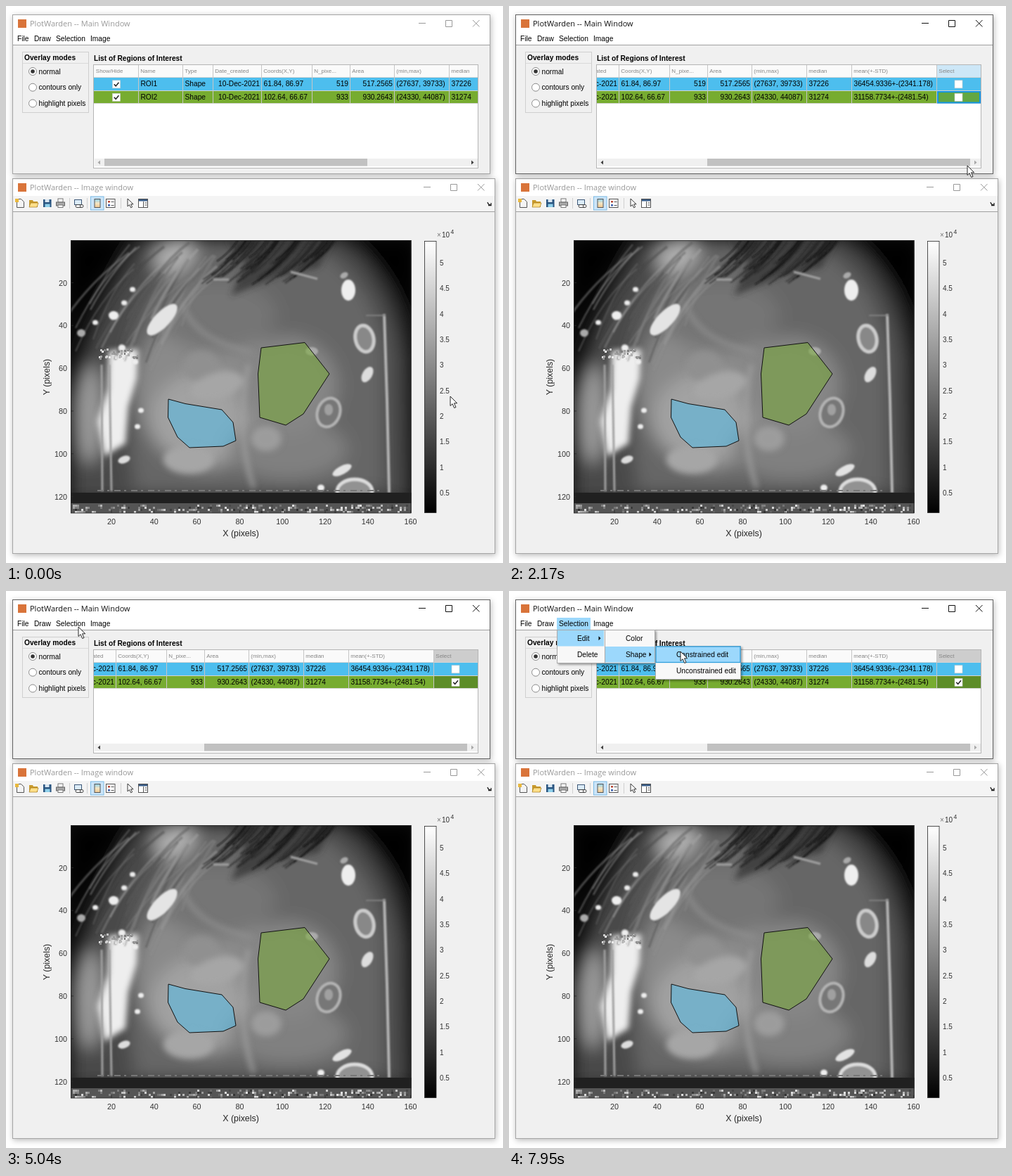
Animation, 707 px wide and 792 px high, one loop 8000 ms. Source, as an HTML page:

```html
<!DOCTYPE html>
<html lang="en">
<head>
<meta charset="utf-8">
<title>Region editor</title>
<style>
html, body { margin: 0; width: 100%; height: 100%; overflow: hidden; background: #fff; }
svg { display: block; font: 10.2px "Liberation Sans", Arial, sans-serif; }
text { white-space: pre; }
.title { font: 11px "Open Sans", sans-serif; }
.head { font-size: 8px; fill: #858585; }
.bold { font-weight: bold; }
.tick { font-size: 10.8px; fill: #333; }
.small { font-size: 10px; fill: #333; }
.axis { font-size: 12.4px; fill: #262626; }
.win { filter: drop-shadow(1px 2px 4px rgba(0,0,0,.28)); }
.menu { filter: drop-shadow(2px 2px 1.5px rgba(0,0,0,.35)); }
</style>
</head>
<body>
<script>
const LOOP = 8000;
const HOT = '#9cd8fc', EDGE = '#2f9fdc';
const BLUE = '#4dbeee', GREEN = '#77ac30';

const text = (x, y, s, attrs = '') => `<text x="${x}" y="${y}" ${attrs}>${s}</text>`;
const rect = (x, y, w, h, fill, attrs = '') =>
  `<rect x="${x}" y="${y}" width="${w}" height="${h}" fill="${fill}" ${attrs}/>`;
const path = (d, attrs = '') => `<path d="${d}" ${attrs}/>`;
const line = (d, color, width = 1, attrs = '') =>
  path(d, `fill="none" stroke="${color}" stroke-width="${width}" ${attrs}`);
const oval = (x, y, rx, ry, fill, turn = 0, attrs = '') =>
  `<ellipse cx="${x}" cy="${y}" rx="${rx}" ry="${ry}" fill="${fill}" transform="rotate(${turn} ${x} ${y})" ${attrs}/>`;
const group = (attrs, ...parts) => `<g ${attrs}>${parts.join('')}</g>`;
const range = (n, fn) => Array.from({ length: n }, (_, i) => fn(i)).join('');
const gray = v => `rgb(${v},${v},${v})`;

let seed = 7;
const rnd = (lo, hi) => {
  seed = seed * 16807 % 2147483647;
  return Math.round(lo + (hi - lo) * seed / 2147483647);
};

// ---- window chrome ----
const frame = (id, x, y, w, h, title) => {
  const cx = x + w, cy = y + 12.5;
  return rect(x + .5, y + .5, w - 1, h - 1, '#f0f0f0', `id="${id}Edge" class="win" stroke="#a5a5a5"`) +
    rect(x + 1, y + 1, w - 2, 25, '#fff') +
    rect(x + 8, y + 7, 12, 12, '#d9743a') +
    text(x + 25, y + 16.5, title, `id="${id}Title" class="title" fill="#999"`) +
    line(`M${cx - 102} ${cy}h10M${cx - 63.5} ${cy - 4}h9v9h-9zM${cx - 25} ${cy - 4.5}l9.5 9.5m0-9.5l-9.5 9.5`,
      '#999', 1, `id="${id}Btns"`);
};

// ---- region table ----
const cols = [125, 188.5, 251.5, 294.5, 363.5, 435.5, 489.5, 552.5, 630.5, 694.5, 815.5, 878.5];
const heads = ['Show/Hide', 'Name', 'Type', 'Date_created', 'Coords(X,Y)', 'N_pixe...', 'Area',
  '(min,max)', 'median', 'mean(+-STD)', 'Select'];
const rightAligned = [3, 5, 6];
const rows = [
  ['ROI1', 'Shape', '10-Dec-2021', '61.84, 86.97', '519', '517.2565', '(27637, 39733)', '37226', '36454.9336+-(2341.178)'],
  ['ROI2', 'Shape', '10-Dec-2021', '102.64, 66.67', '933', '930.2643', '(24330, 44087)', '31274', '31158.7734+-(2481.54)']
];
const tick = (x, y) => line(`M${x - 3.2} ${y}l2.4 2.6l4.2-5.2`, '#222', 1.6);
const box = (x, y) => rect(x - 5.5, y - 5.5, 11, 11, '#fff', 'stroke="#ccc" stroke-width=".6"');

const row = (cells, i) => {
  const y = 102 + i * 18.5;
  return rect(125, y, 753, 18, i ? GREEN : BLUE) +
    box(157, y + 9.3) + tick(157, y + 9.3) +
    (i ? rect(815.5, y, 62.5, 18, '#62a743', 'id="cell"') : '') +
    box(846.5, y + 9.3) +
    cells.map((s, k) => rightAligned.includes(k + 1)
      ? text(cols[k + 2] - 2.5, y + 12, s, 'text-anchor="end"')
      : text(cols[k + 1] + 3, y + 12, s)).join('');
};

const table =
  rect(124.5, 83.5, 547, 147, '#fff', 'stroke="#b5b5b5"') +
  group('clip-path="url(#view)"', group('id="grid"',
    rect(125, 84, 753, 17.5, '#fafafa'),
    rect(815.5, 84, 62.5, 17.5, '#cde7f7', 'id="selHead"'),
    heads.map((s, i) => text(cols[i] + 2.8, 94.5, s, 'class="head"')).join(''),
    rows.map(row).join(''),
    line('M125 101.5h753M125 120.5h753M125 138.5h753', '#d4d4d4'),
    line(cols.slice(1).map(x => `M${x} 84v54`).join(''), '#c6c6c6'),
    rect(817, 122, 60, 15.5, 'none', 'id="focus" stroke="#1296e6" stroke-width="2"'),
    group('id="checked"', tick(846.5, 129.8)))) +
  rect(126, 217, 545, 11, '#f0f0f0') +
  rect(140, 217, 374, 10.5, '#c1c1c1', 'id="thumb"') +
  path('M134 219.5v6l-3.5-3z', 'id="goLeft"') + path('M662 219.5v6l3.5-3z', 'id="goRight"');

const radio = (y, label, on) =>
  `<circle cx="38" cy="${y}" r="5.5" fill="#fff" stroke="#8c8c8c"/>` +
  (on ? `<circle cx="38" cy="${y}" r="2.8" fill="#333"/>` : '') + text(46.5, y + 3.5, label);

const mainWindow = frame('main', 9, 12, 680, 227, 'PlotWarden -- Main Window') +
  rect(10, 38, 678, 17.5, '#fff') + line('M10 55.5h678', '#a0a0a0') +
  rect(68, 38, 48, 17, HOT, 'id="barHot"') +
  text(16, 50, 'File') + text(40, 50, 'Draw') + text(71, 50, 'Selection') + text(120, 50, 'Image') +
  rect(23.5, 65.5, 94, 86, 'none', 'stroke="#cfcfcf"') + line('M24 81.5h93', '#dadada') +
  text(26, 77, 'Overlay modes', 'class="bold"') +
  radio(93, 'normal', true) + radio(115.7, 'contours only') + radio(138.5, 'highlight pixels') +
  text(125, 77.5, 'List of Regions of Interest', 'class="bold"') + table;

// ---- toolbar ----
const tools =
  line('M15.5 274.5h6l4 4v8h-10z', '#555') + path('M13 274h5v5h-5z', 'fill="#e9b83c"') +
  path('M33 276h5l1 2h6v8h-12z', 'fill="#c89a2c"') + path('M35 280h11l-2 6h-11z', 'fill="#ffe08a" stroke="#a47a1c" stroke-width=".7"') +
  rect(53, 275, 11.5, 11, '#2a5580') + rect(55.5, 275, 6, 4, '#d8e6f2') + rect(55.5, 281.5, 7, 4.5, '#8fd0ea') +
  rect(74, 274, 7, 5, '#fff', 'stroke="#777"') + rect(71.5, 279, 12, 5, '#aaa', 'stroke="#666"') + rect(74, 283, 7, 3.5, '#fff', 'stroke="#777"') +
  rect(97.5, 275.5, 10, 7, '#dcecf8', 'stroke="#3d5878"') + line('M101 286.5h3a2 2 0 0 0 0-4h-3a2 2 0 0 0 0 4m4 0h3a2 2 0 0 0 0-4h-3', '#444') +
  rect(120.5, 271, 18.5, 19, '#cce5f8', 'stroke="#7cbce8"') +
  rect(126, 274.5, 8, 12, 'url(#scale)', 'stroke="#555"') +
  rect(142.5, 274.5, 12.5, 12, '#fff', 'stroke="#555"') + rect(145, 277, 3, 2.5, '#bb4a38') + rect(145, 282, 3, 2.5, '#3c62b0') +
  line('M149.5 278.5h4m-4 5h4', '#555') +
  path('M173 274v11l2.6-2.4 2 4.2 2-1-2-4h3.5z', 'fill="#fff" stroke="#222" stroke-width=".9"') +
  rect(188.5, 274.5, 13, 12, '#fff', 'stroke="#555"') + rect(189, 275, 12, 2.5, '#365a86') + line('M195.5 278v8m2-6h3m-3 3h3', '#555') +
  line('M90.5 273v15M115.5 273v15M163.5 273v15', '#d0d0d0') +
  line('M685 279q1 4 5 4m0-3v3.5h-4', '#222', 1.3);

// ---- photograph as soft tonal shapes ----
const spot = (x, y, r, c = '#eee') => oval(x, y, r, r * .9, c);
const fibre = () => {
  const x = rnd(175, 310), dx = rnd(45, 95), y = rnd(335, 390);
  return line(`M${x} ${y}q${-dx * .6} 40 ${-dx} ${rnd(85, 130)}`, gray(rnd(70, 165)), rnd(2, 4), 'opacity=".5"');
};
const hair = () => {
  const x = rnd(325, 470), h = rnd(25, 65);
  return line(`M${x} 333q${-h * .4} ${h * .6} ${-h} ${h}`, gray(rnd(12, 50)), 2, 'opacity=".75"');
};
const speck = (x, y, lo, hi) => rect(x, y, 3, 3, gray(rnd(lo, hi)));

const photo = group('clip-path="url(#plot)"',
  rect(92, 333, 485, 389, '#0c0c0c'),
  group('filter="url(#b12)"',
    path('M92 705V560Q120 440 190 330L480 330Q560 395 572 500L575 705z', 'fill="#484848"'),
    path('M180 690L172 500Q190 410 250 335L450 350Q530 400 538 500L538 690z', 'fill="#666"'),
    oval(285, 545, 100, 115, '#8a8a8a'), oval(285, 585, 78, 65, '#a2a2a2'),
    oval(400, 630, 85, 42, '#808080'), oval(400, 540, 72, 70, '#868686'),
    oval(300, 440, 85, 50, '#747474'), oval(240, 355, 32, 24, '#b0b0b0', -35),
    oval(118, 580, 20, 70, '#9a9a9a'), oval(150, 670, 35, 20, '#4a4a4a'),
    path('M92 470Q110 400 175 334L92 334z M505 334H580V480Q565 395 505 350z', 'fill="#000"')),
  group('filter="url(#b4)"',
    path('M315 334L465 334L445 372L385 385L320 412L340 365z', 'fill="#383838" opacity=".8"'),
    path('M146 490L188 488L186 530L174 570L170 622L140 640L130 590L145 545z', 'fill="#eee"'),
    oval(278, 512, 26, 22, '#909090'), oval(300, 540, 38, 18, '#a6a6a6', -15),
    oval(260, 645, 36, 20, '#a6a6a6'), oval(370, 615, 22, 18, '#9c9c9c'),
    line('M345 510Q325 600 352 685', '#a0a0a0', 5),
    line('M250 420Q265 475 350 492', '#909090', 5)),
  group('filter="url(#b1)"',
    range(32, fibre), range(55, hair),
    oval(222, 446, 29, 11, '#e4e4e4', -46),
    oval(487, 404, 10, 15, '#eee'), oval(481, 383, 6, 4, '#aaa', -30),
    oval(510, 473, 13, 19, '#888', -12, 'stroke="#ccc" stroke-width="5"'),
    oval(514, 524, 7, 12, '#ddd', 30),
    oval(459, 578, 16, 21, '#777', 20, 'stroke="#b4b4b4" stroke-width="4"'), oval(459, 574, 6, 8, '#a0a0a0'),
    oval(478, 660, 15, 6, '#e2e2e2', -28), oval(496, 690, 25, 17, '#929292', 0, 'stroke="#ddd" stroke-width="5"'),
    oval(435, 491, 9, 6, '#aaa'), oval(168, 645, 9, 5, '#ddd', -20),
    line('M538 438L542 560L545 692', '#b4b4b4', 4), line('M512 440H540', '#808080', 2),
    line('M136 510L137 690M147 510L150 690', '#a0a0a0', 3),
    spot(153, 440, 7), spot(127, 450, 4), spot(107, 465, 6, '#aaa'), spot(165, 486, 5), spot(168, 422, 4),
    spot(180, 403, 4), spot(184, 506, 4), spot(192, 575, 4), spot(187, 598, 4), spot(448, 685, 5),
    line('M295 389h22M405 378l38 10', '#a0a0a0', 3)),
  range(45, () => speck(rnd(132, 188), rnd(487, 500), 120, 250)),
  rect(92, 692, 485, 15, '#202020'), line('M130 689H538', '#777', 2, 'stroke-dasharray="9 5 3 7"'),
  rect(92, 707, 485, 15, '#555'),
  range(260, () => speck(92 + rnd(0, 160) * 3, 709 + rnd(0, 3) * 3, 50, 230)));

const region = (points, color) =>
  `<polygon points="${points}" fill="${color}" fill-opacity=".5" stroke="#111"/>`;

const imageWindow = frame('img', 9, 245, 687, 534, 'PlotWarden -- Image window') +
  rect(10, 270, 685, 22, '#f4f4f4') + line('M10 292.5h685', '#a0a0a0') + tools + photo +
  region('231,559 255,565.5 307,574 323,592 327,618 309,626 261,628 244,613 230.5,585', BLUE) +
  region('363,486 425,478.5 460,523 423,580 398,596 361,585 358.5,523', GREEN) +
  rect(92.5, 333.5, 483.5, 387.5, 'none', 'stroke="#262626" stroke-width=".8"') +
  range(8, i => text(150 + i * 60.8, 737, 20 * (i + 1), 'class="tick" text-anchor="middle"') +
    line(`M${150 + i * 60.8} 721v-4`, '#262626', .8)) +
  range(6, i => text(87, 397.5 + i * 60.8, 20 * (i + 1), 'class="tick" text-anchor="end"') +
    line(`M92 ${393.5 + i * 60.8}h4`, '#262626', .8)) +
  text(334, 754, 'X (pixels)', 'class="axis" text-anchor="middle"') +
  text(0, 0, 'Y (pixels)', 'class="axis" text-anchor="middle" transform="translate(61.5 527.5) rotate(-90)"') +
  rect(595.5, 334.5, 16.5, 386, 'url(#ramp)', 'stroke="#262626" stroke-width=".8"') +
  range(10, i => text(617, 695.8 - i * 36.3, (i + 1) / 2, 'class="small"')) +
  text(613, 328.5, '×', 'font-size="10" fill="#777"') + text(620, 328.5, '10', 'class="small"') +
  text(632.5, 323.5, '4', 'font-size="8.5" fill="#333"');

// ---- menus ----
const item = (id, x, y, w, tx, label, sub) =>
  rect(x + 1, y, w - 2, 22.5, HOT, `id="${id}" stroke="${EDGE}" stroke-width="1.3"`) +
  text(tx, y + 14.8, label) + (sub ? path(`M${x + w - 8.5} ${y + 8.3}v6l3-3z`) : '');
const menu = (id, x, y, w, ...items) => group(`id="${id}"`,
  rect(x + .5, y + .5, w - 1, 47, '#f8f8f8', 'stroke="#a9a9a9" class="menu"'), ...items);

const menus =
  menu('menu1', 68, 55, 69, item('edit', 68, 56, 68, 97, 'Edit', true), item('del', 68, 79, 68, 97, 'Delete')) +
  menu('menu2', 136, 55, 72, item('color', 136, 56, 72, 166, 'Color'), item('shape', 136, 79, 72, 166, 'Shape', true)) +
  menu('menu3', 208, 78, 122, item('cons', 208, 79, 122, 238, 'Constrained edit'), item('uncons', 208, 102, 122, 238, 'Unconstrained edit'));

const blur = (id, d) => `<filter id="${id}" x="-20%" y="-20%" width="140%" height="140%"><feGaussianBlur stdDeviation="${d}"/></filter>`;
const ramp = (id, colors) => `<linearGradient id="${id}" x1="0" y1="1" x2="0" y2="0">` +
  colors.map((c, i) => `<stop offset="${i / (colors.length - 1)}" stop-color="${c}"/>`).join('') + '</linearGradient>';

document.body.innerHTML = `<svg width="707" height="792" viewBox="0 0 707 792"><defs>
  ${blur('b12', 12)}${blur('b4', 4)}${blur('b1', 1.1)}
  ${ramp('ramp', ['#000', '#fff'])}${ramp('scale', ['#f0c890', '#f4e6c4', '#8fd0ea'])}
  <clipPath id="view"><rect x="125" y="84" width="546" height="140"/></clipPath>
  <clipPath id="plot"><rect x="92" y="333" width="484.5" height="388"/></clipPath></defs>
  ${imageWindow}${mainWindow}${menus}
  <circle id="press" r="10.5" fill="#e5dc22" fill-opacity=".75"/>
  ${path('M0 0V13.5L3.1 10.7L5.7 16.5L8 15.5L5.5 9.8H9.7z', 'id="cursor" fill="#fff" stroke="#111" stroke-width=".9"')}
</svg>`;

// ---- motion ----
const el = id => document.getElementById(id);
const set = (id, attrs) => { for (const k in attrs) el(id).setAttribute(k, attrs[k]); };
const show = (id, on) => set(id, { visibility: on ? 'visible' : 'hidden' });

// time, x, y, and 1 where the move into the point is eased
const track = [
  [70, 632, 555], [830, 494, 223, 1], [1260, 494, 223], [1750, 599, 229], [2030, 652, 229], [2100, 652, 229],
  [2880, 640, 146, 1], [2950, 638, 138], [3050, 639, 133], [3350, 639, 133], [3700, 581, 169],
  [4150, 420, 205], [4550, 236, 119], [5040, 103, 51], [5150, 95, 46], [5800, 95, 46], [6140, 104, 66, 1],
  [6470, 104, 66], [6940, 167, 64, 1], [7000, 167, 64], [7240, 175, 83, 1], [7310, 175, 83], [7380, 175, 88],
  [7600, 175, 88], [7940, 244, 86, 1]
];
const scroll = [[1200, 0], [1260, 1], [1750, 145], [2000, 207]];

function at(keys, t) {
  const i = keys.findIndex(k => k[0] > t);
  if (i === 0) return keys[0].slice(1);
  if (i < 0) return keys[keys.length - 1].slice(1);
  const a = keys[i - 1], b = keys[i];
  let p = (t - a[0]) / (b[0] - a[0]);
  if (b[3]) p = p * p * (3 - 2 * p);
  return a.slice(1, 3).map((v, k) => Math.round(v + (b[k + 1] - v) * p));
}

function hot(id, on, here) {
  show(id, on);
  set(id, { 'stroke-opacity': here ? 1 : 0 });
}

function draw(t) {
  const within = (a, b = LOOP) => t >= a && t < b;
  const [x, y] = at(track, t);
  const [s] = at(scroll, t);
  const active = within(940);

  set('cursor', { transform: `translate(${x} ${y})` });
  set('press', { cx: x, cy: y });
  show('press', within(980, 2065) || within(3100, 3260) || within(5180, 5340));

  set('mainEdge', { stroke: active ? '#626262' : '#a5a5a5' });
  set('mainTitle', { fill: active ? '#111' : '#999' });
  set('mainBtns', { stroke: active ? '#111' : '#999' });

  set('grid', { transform: `translate(${-s} 0)` });
  set('thumb', {
    x: Math.round(140 + s * 142 / 207),
    fill: within(980, 2100) ? '#767676' : within(810, 980) ? '#a6a6a6' : '#c1c1c1'
  });
  set('goLeft', { fill: s > 0 ? '#404040' : '#a8a8a8' });
  set('goRight', { fill: s < 207 ? '#404040' : '#a8a8a8' });

  const focused = t < 4900;
  show('focus', focused);
  show('checked', within(3200));
  set('selHead', { fill: focused ? '#cde7f7' : '#cdcdcd' });
  set('cell', { fill: focused ? '#62a743' : '#5d8d28' });

  const color = within(6700, 7140), shape = within(7140), cons = within(7775);
  show('barHot', within(5200));
  show('menu1', within(5200));
  show('menu2', within(6100));
  show('menu3', within(7220));
  hot('edit', within(5960), t < 6700);
  hot('del', false);
  hot('color', color, true);
  hot('shape', shape, !cons);
  hot('cons', cons, true);
  hot('uncons', false);
}

function tickFrame() {
  draw(performance.now() % LOOP);
  requestAnimationFrame(tickFrame);
}
tickFrame();
</script>
</body>
</html>
```
